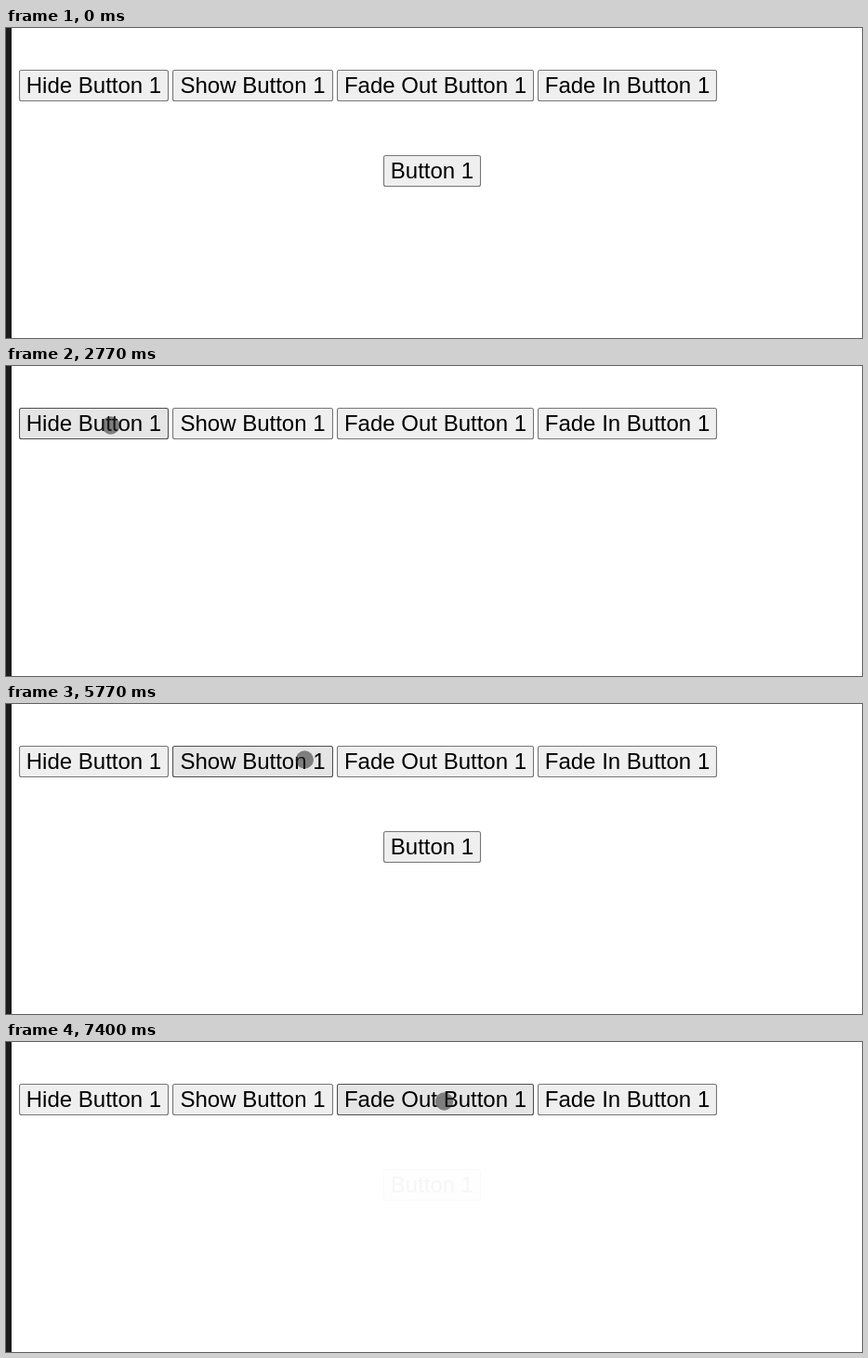
An HTML page that plays this animation: 921x334 px, repeating every 8000 ms.

```html
<!DOCTYPE html>
<html lang="en">
<head>
<meta charset="utf-8">
<title>Button demo</title>
<style>
  html, body { margin: 0; width: 100%; height: 100%; overflow: hidden; background: #fff; }
  svg { display: block; }
  text { font: 24px "Liberation Sans", Arial, sans-serif; text-anchor: middle; }
  rect.face { fill: #efefef; stroke: #767676; stroke-width: 1.1; }
  .active .face { fill: #f5f5f5; stroke: #8d8d8d; }
  .hover .face { fill: #e5e5e5; stroke: #4f4f4f; }
</style>
</head>
<body>
<svg id="stage" width="921" height="334" viewBox="0 0 921 334">
  <rect width="6" height="334" fill="#1b1b1c"/>
  <circle id="pointer" r="9.7" fill="#2a2a2a" fill-opacity=".55"/>
</svg>
<script>
const LOOP = 8000;
const stage = document.getElementById('stage');
const pointer = document.getElementById('pointer');

function addButton(label, x, y, width) {
  const g = document.createElementNS('http://www.w3.org/2000/svg', 'g');
  g.innerHTML = `<rect class="face" x="${x + 0.5}" y="${y + 0.5}" width="${width - 1}" height="33" rx="2"/>
    <text x="${x + width / 2}" y="${y + 25}">${label}</text>`;
  stage.insertBefore(g, pointer);
  return g;
}

const hide = addButton('Hide Button 1', 14, 45, 161);
const show = addButton('Show Button 1', 179, 45, 173);
const fadeOut = addButton('Fade Out Button 1', 356, 45, 212);
addButton('Fade In Button 1', 572, 45, 193);
const box = addButton('Button 1', 406, 137, 105);

// Each tap: button, press time, release time, end of hover.
const taps = [
  [hide, 1500, 1670, 4200],
  [show, 4200, 4370, 7070],
  [fadeOut, 7070, 7240, LOOP]
];

// Pointer path: time, x, y.
const path = [
  [500, 213, 3], [600, 182, 42], [730, 149, 64], [880, 113, 65], [1070, 94, 65],
  [2755, 94, 65], [2770, 112, 64], [2900, 172, 55], [3060, 225, 53], [3330, 265, 62],
  [5440, 265, 62], [5600, 287, 60.5], [5770, 321, 60], [5900, 385, 61], [6030, 451, 63],
  [6100, 471.5, 64], [LOOP, 471.5, 64]
];

const secant = (i, k) => (path[i + 1][k] - path[i][k]) / (path[i + 1][0] - path[i][0]);

// Harmonic mean of the neighbouring slopes, so the curve never overshoots.
function slope(i, k) {
  if (i === 0) return secant(0, k);
  if (i === path.length - 1) return 0;
  const a = secant(i - 1, k), b = secant(i, k);
  return a * b > 0 ? 2 * a * b / (a + b) : 0;
}

function position(t, k) {
  let i = 0;
  while (i < path.length - 2 && t >= path[i + 1][0]) i++;
  const span = path[i + 1][0] - path[i][0];
  const u = (t - path[i][0]) / span, v = 1 - u;
  return path[i][k] * (1 + 2 * u) * v * v + slope(i, k) * span * u * v * v
    + path[i + 1][k] * (3 - 2 * u) * u * u - slope(i + 1, k) * span * u * u * v;
}

function boxOpacity(t) {
  if (t >= 1500 && t < 4200) return 0;
  if (t < 7070) return 1;
  const progress = (Math.min(t, 7400) - 7044) / 400;
  return 0.5 + Math.cos(Math.PI * progress) / 2;
}

function draw(t) {
  for (const [button, press, release, end] of taps) {
    const state = t < press || t >= end ? '' : t < release ? 'active' : 'hover';
    button.setAttribute('class', state);
  }
  box.setAttribute('opacity', boxOpacity(t));
  pointer.setAttribute('visibility', t < 500 ? 'hidden' : 'visible');
  if (t >= 500) {
    pointer.setAttribute('cx', position(t, 1));
    pointer.setAttribute('cy', position(t, 2));
  }
}

const start = performance.now();
function tick() {
  draw((performance.now() - start) % LOOP);
  requestAnimationFrame(tick);
}
tick();
</script>
</body>
</html>
```
